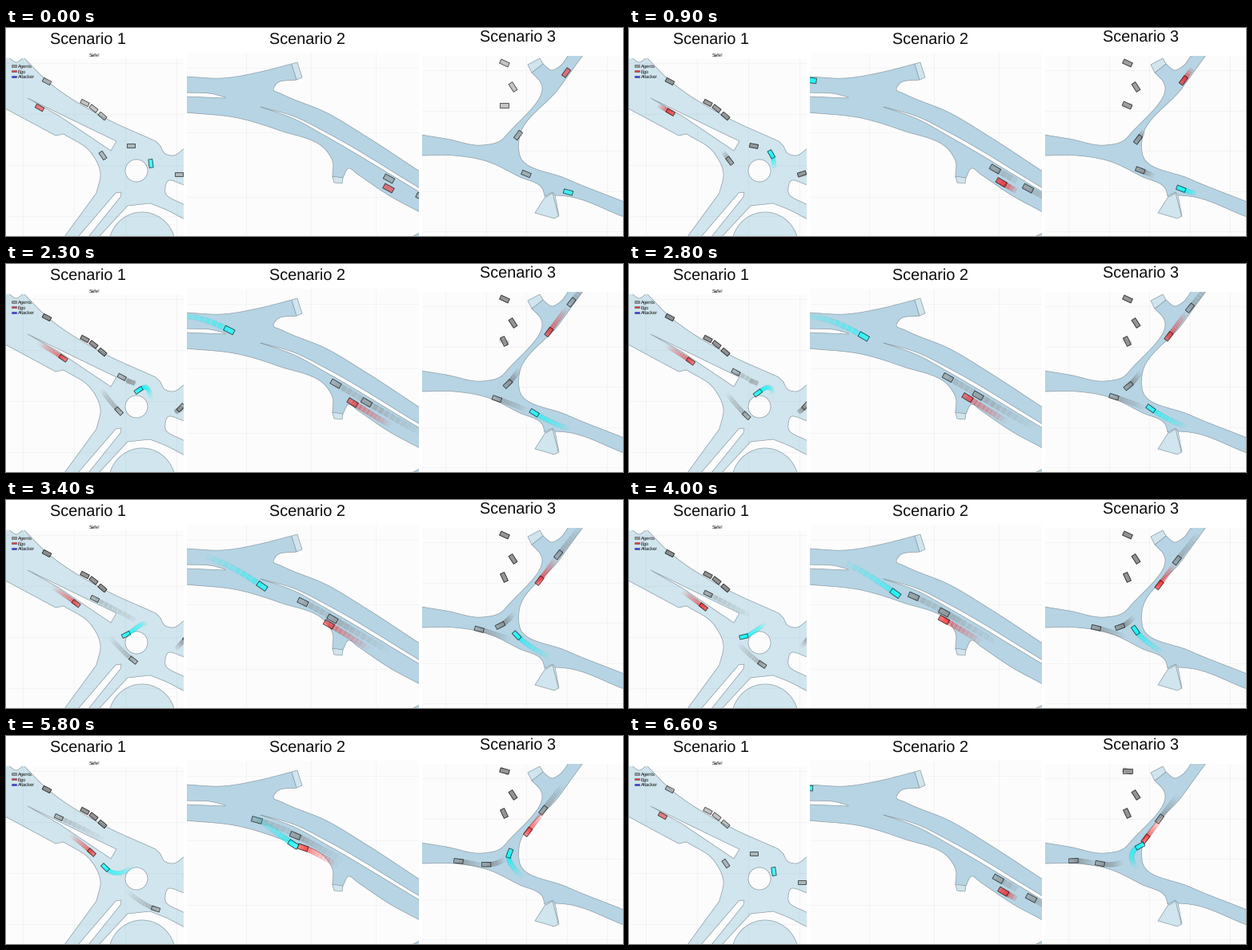
A matplotlib script that plays this animation: 771 by 261 pixels, repeating every 6.7 s.

```python
import numpy as np
import matplotlib.pyplot as plt
from matplotlib.animation import FuncAnimation
from matplotlib.collections import PolyCollection
from matplotlib.colors import to_rgba
from matplotlib.patches import Circle, Ellipse, Polygon, Rectangle

W, H, DPI = 771, 261, 100
FRAMES, INTERVAL = 67, 100
PX = 72 / DPI
TRAIL = 9

PAPER, GRID, EDGE = "#fcfcfc", "#f1f1f1", "#8b9ba3"
PALE, ROAD = "#d0e5ee", "#b6d4e4"
GREY, RED, CYAN = "#808080", "#ff0000", "#00ffff"
BODY_ALPHA = {GREY: 0.45, RED: 0.46, CYAN: 0.65}
TRAIL_ALPHA = {GREY: 0.2, RED: 0.2, CYAN: 0.36}

plt.rcParams.update({"text.hinting": "none", "font.family": "Liberation Sans"})
fig = plt.figure(figsize=(W / DPI, H / DPI), dpi=DPI, facecolor="white")
ax = fig.add_axes([0, 0, 1, 1])
ax.set(xlim=(0, W), ylim=(H, 0))
ax.axis("off")


def label(x, y, text, size, ha="center"):
    ax.text(x, y, text, fontsize=size * PX, color="#0c0c0c", ha=ha,
            va="baseline", zorder=9)


def smooth(*points):
    """Sample a smooth curve through the points."""
    p = np.array(points, float)
    t = np.r_[0, np.cumsum(np.hypot(*np.diff(p, axis=0).T))]
    m = np.gradient(p, t, axis=0)
    s = np.linspace(0, 1, 12)[:, None]
    parts = []
    for i, h in enumerate(np.diff(t)):
        parts.append((2 * s**3 - 3 * s**2 + 1) * p[i] + (3 * s**2 - 2 * s**3) * p[i + 1]
                     + h * ((s**3 - 2 * s**2 + s) * m[i] + (s**3 - s**2) * m[i + 1]))
    return np.vstack(parts)


def panel(x0, x1, y0, color, origin, step, grid_z=0.5):
    box = Rectangle((x0, y0), x1 - x0, H - y0, fc=color, ec="none", zorder=0)
    ax.add_patch(box)
    style = dict(color="#888888", alpha=0.1, lw=0.7 * PX, zorder=grid_z)
    for x in np.arange(x0 + origin[0], x1, step):
        ax.plot([x, x], [y0, H], **style)
    for y in np.arange(y0 + origin[1], H, step):
        ax.plot([x0, x1], [y, y], **style)
    return box


def shape(clip, color, *pieces):
    patch = Polygon(np.vstack(pieces), fc=color, ec=EDGE, lw=0.7 * PX, zorder=1)
    ax.add_patch(patch)
    patch.set_clip_path(clip)


def ramp(u, start, span):
    return np.clip((u - start) / span, 0, 1)


class Parked:
    """A standing car that may turn on the spot."""

    def __init__(self, x, y, heading, turn=0, start=0):
        self.color, self.place = GREY, np.array((x, y))
        self.heading, self.turn, self.start = heading, turn, start

    def pose(self, u):
        return self.place, self.heading + self.turn * ramp(u, self.start, 8)


class Driver:
    """A car on a polynomial path through evenly timed points, nose along the path."""

    def __init__(self, color, *points, end=24, wait=0):
        self.color, self.wait = color, wait
        times = np.linspace(wait, end, len(points))
        self.path = np.polyfit(times, np.array(points, float), len(points) - 1)

    def at(self, u):
        return np.polyval(self.path, u)

    def pose(self, u):
        v = max(u, self.wait)
        dx, dy = self.at(v + 0.1) - self.at(v - 0.1)
        heading = (np.degrees(np.arctan2(dy, dx)) + 90) % 180 - 90
        if self.wait:
            heading *= ramp(u, 0, self.wait)
        return self.at(v), heading


class Traffic:
    def __init__(self, clip, size, cars):
        self.cars = cars
        self.corners = np.array([(-1, -1), (1, -1), (1, 1), (-1, 1)]) * size / 2
        self.boxes = PolyCollection([], linewidths=0.9 * PX, zorder=4)
        ax.add_collection(self.boxes, autolim=False)
        self.boxes.set_clip_path(clip)

    def box(self, car, u):
        place, heading = car.pose(u)
        c, s = np.cos(np.radians(heading)), np.sin(np.radians(heading))
        return self.corners @ np.array([(c, s), (-s, c)]) + place

    def draw(self, u):
        verts, fills, edges = [], [], []

        def add(car, v, fill, edge):
            verts.append(self.box(car, v))
            fills.append(to_rgba(car.color, fill))
            edges.append((0, 0, 0, edge))

        last = int(np.ceil(u))
        for car in self.cars:
            for step in range(max(0, last - TRAIL), last):
                fade = 1 - (u - step) / (TRAIL + 2)
                add(car, step, TRAIL_ALPHA[car.color] * fade, 0.04 * fade)
            add(car, u, BODY_ALPHA[car.color], 0.65)
        self.boxes.set_verts(verts)
        self.boxes.set_facecolor(fills)
        self.boxes.set_edgecolor(edges)


# Roundabout: a paved panel with open ground cut out of it
p1 = panel(0, 222, 38, PALE, (21, 6), 64, grid_z=2)
shape(p1, PAPER, smooth((22, 37), (51, 66), (122, 112), (187, 142)),
      smooth((193, 148), (198, 157), (209, 160), (223, 151)), [(223, 37)])
shape(p1, PAPER, smooth((3, 37), (13, 43), (22, 37)))
shape(p1, PAPER, [(-1, 101), (62, 135)],
      smooth((72, 133), (105, 155), (118, 182), (113, 207)), [(73, 262), (-1, 262)])
shape(p1, PAPER, [(27, 88), (111, 129), (138, 142), (131, 154), (66, 110)])
shape(p1, PAPER, [(90, 262), (137, 207), (144, 206), (143, 212), (103, 262)])
shape(p1, PAPER, [(116, 262), (152, 223)],
      smooth((180, 220), (200, 228), (223, 240)), [(223, 262)])
shape(p1, PAPER, smooth((223, 197), (202, 192), (199, 206), (223, 222)))
for island in (Circle((163, 179), 14, fc=PAPER), Ellipse((170, 275), 84, 88, fc=PALE)):
    island.set(ec=EDGE, lw=0.7 * PX, zorder=1)
    ax.add_patch(island)
    island.set_clip_path(p1)

# Curved main road
p2 = panel(226, 516, 31, PAPER, (74, 19), 81)
shape(p2, ROAD, smooth((225, 61), (270, 63), (318, 55), (357, 45)),
      smooth((363, 65), (338, 70), (334, 77), (345, 83), (400, 106), (450, 136), (517, 180)),
      smooth((517, 231), (480, 211), (440, 184), (428, 176), (421, 188)),
      smooth((408, 187), (408, 167), (402, 156), (340, 128), (290, 113), (225, 106)))
shape(p2, PALE, [(357, 45), (364, 43), (370, 62), (363, 65)])
shape(p2, PALE, [(408, 186), (421, 188), (420, 195), (410, 194)])
shape(p2, PAPER, smooth((225, 81), (260, 83), (274, 87)), smooth((274, 88), (225, 86)))
shape(p2, PAPER, smooth((318, 99), (360, 111), (400, 131), (517, 201)),
      smooth((517, 206), (400, 136), (360, 114), (318, 99)))
shape(p2, ROAD, [(507, 262), (517, 257), (517, 262)])

# T-junction
p3 = panel(520, 771, 35, PAPER, (29, 18), 50.5)
shape(p3, ROAD, smooth((519, 134), (550, 139), (595, 147), (617, 142), (630, 129),
                       (668, 68), (657, 56)),
      smooth((671, 45), (682, 53), (692, 48), (703, 34)),
      [(721, 34)], smooth((690, 77), (641, 140), (642, 160), (700, 189), (772, 218)),
      smooth((772, 237), (700, 211), (688, 210)),
      smooth((673, 211), (671, 203), (640, 186), (600, 167), (560, 160), (519, 160)))
shape(p3, PALE, [(652, 46), (667, 38), (671, 45), (657, 56)])
shape(p3, PALE, [(675, 210), (661, 232), (685, 239), (691, 236), (686, 210), (683, 206)])
ax.plot([675, 683, 690], [212, 207, 235], color=EDGE, lw=0.7 * PX, zorder=2)

roundabout = Traffic(p1, (10.5, 5), [
    Parked(51, 67, 28),
    Parked(98.5, 94, 28),
    Parked(109.5, 101, 38),
    Parked(120.5, 110.5, 40),
    Driver(GREY, (121, 160), (136, 179), (159, 201), (187, 217)),
    Driver(GREY, (156, 148), (111, 124), (66, 102), wait=8),
    Driver(GREY, (216, 183), (236, 161), wait=8),
    Driver(RED, (42, 100), (77, 122), (107, 146)),
    Driver(CYAN, (181, 170), (170, 156), (150, 169), (124, 165)),
])

curve = Traffic(p2, (13, 6.5), [
    Driver(GREY, (478.5, 189), (425.5, 158), (371, 128), (313.5, 105.5)),
    Driver(GREY, (519, 212), (465, 182), (408, 149), (361.5, 125)),
    Driver(RED, (478, 201), (443, 180), (403.5, 156), (371, 140)),
    Driver(CYAN, (204, 66), (264, 76), (320, 108), (359, 136)),
])

junction = Traffic(p3, (11.5, 5.5), [
    Parked(623, 44, 25, turn=-25, start=20),
    Parked(633.5, 74, 57),
    Parked(622.5, 97, 0, turn=65),
    Driver(GREY, (738, 9), (695.5, 62), (663, 104), end=28),
    Driver(GREY, (640, 134.5), (628, 149.5), (612.5, 159.5), (588.5, 160), end=28),
    Driver(GREY, (650, 183), (616, 170), (582, 160), (555.5, 156.5), end=28),
    Driver(RED, (700, 56), (670.5, 96), (645.5, 129), end=28),
    Driver(CYAN, (702.5, 206), (663, 188.5), (632, 162), (638.5, 138), end=28),
])

for number, x, y in ((1, 102.7, 19.5), (2, 376.5, 19.5), (3, 639.5, 17)):
    label(x, y, f"Scenario {number}", 19.9)
label(110.7, 36, "Safe!", 5.9)
legend = (("Agents", GREY), ("Ego", RED), ("Attacker", "#0000ff"))
for row, (name, color) in enumerate(legend):
    y = 47.5 + 6.8 * row
    ax.add_patch(Rectangle((6.5, y - 1.2), 6, 2.4, fc=color, ec="#222222",
                           lw=0.5 * PX, alpha=0.75, zorder=8))
    label(15, y + 2, name, 5.8, "left")

# Playback halts now and then, and its pace drifts
HALTS = (range(0, 4), range(41, 43), range(47, 48), range(51, 53), range(60, 64))
TICKS = np.cumsum([not any(f in halt for halt in HALTS) for f in range(FRAMES)])
RESTART = 64


def update(frame):
    u = np.interp(TICKS[frame], [0, 15, 25, 31, 42, 50, 54], [0, 8, 12, 16, 20, 24, 28])
    restarted = frame >= RESTART
    roundabout.draw(0 if restarted else u)
    curve.draw(1.3 * (frame - RESTART) if restarted else u)
    junction.draw(u)
    return roundabout.boxes, curve.boxes, junction.boxes


anim = FuncAnimation(fig, update, frames=FRAMES, interval=INTERVAL,
                     repeat=True, repeat_delay=0, blit=False)
plt.show()
```
